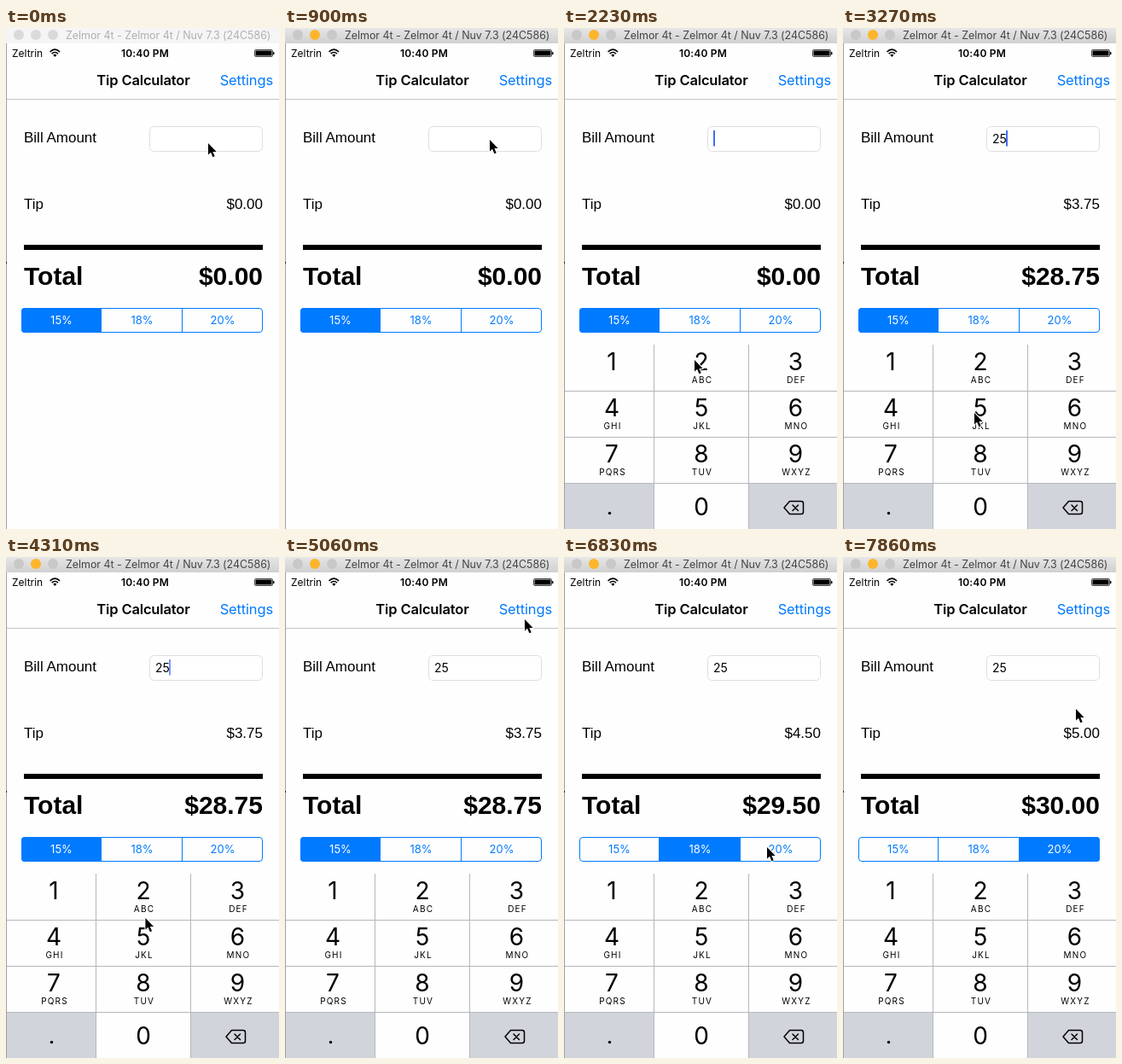
An HTML page that plays this animation: 320 by 587 pixels, repeating every 8000 ms.

```html
<!DOCTYPE html>
<html lang="en">
<head>
<meta charset="utf-8">
<title>Tip Calculator</title>
<style>
  html, body { margin: 0; height: 100%; overflow: hidden; background: #fff; }
  svg { display: block; width: 100vw; height: 100vh; }
  text { font-family: Inter, Roboto, sans-serif; white-space: pre; }
  .label { font: 17px "Liberation Sans", sans-serif; }
  .total { font: bold 30px "Liberation Sans", sans-serif; }
  .nav { font-size: 16.5px; letter-spacing: -.15px; }
  .status { font-size: 12px; }
  .semi { font-weight: 600; }
  .mid { text-anchor: middle; }
  .end { text-anchor: end; }
  .segment { font-size: 13px; }
  .digit { font-size: 28px; }
  .letters { font-size: 10px; letter-spacing: 1.2px; }
</style>
</head>
<body>
<svg viewBox="0 0 320 587">
  <defs>
    <linearGradient id="chrome" x2="0" y2="1">
      <stop stop-color="#e6e6e6"/><stop offset="1" stop-color="#d0d0d0"/>
    </linearGradient>
    <clipPath id="segmentClip"><rect x="18" y="328" width="283" height="29" rx="4"/></clipPath>
  </defs>
  <rect width="320" height="587" fill="#fefefe"/>

  <rect id="titleBar" width="320" height="18"/>
  <g id="lights"></g>
  <text id="title" x="70" y="13" font-size="12.5" letter-spacing="-.05">Zelmor 4t - Zelmor 4t / Nuv 7.3 (24C586)</text>

  <text class="status" x="7" y="33.5">Zeltrin</text>
  <g fill="none" stroke="#000" stroke-width="1.6">
    <path d="M51.5 28Q57.3 22.4 63.1 28M53.6 30.2Q57.3 26.8 61 30.2"/>
    <path d="M57.3 34L55.2 31.6Q57.3 29.8 59.4 31.6Z" fill="#000" stroke="none"/>
  </g>
  <text class="status semi mid" x="163" y="33.5" letter-spacing=".2">10:40 PM</text>
  <rect x="291.5" y="25.5" width="21" height="8" rx="1.5" fill="none" stroke="#000" stroke-width=".7"/>
  <rect x="292.5" y="26.5" width="19" height="6" rx=".6"/>
  <rect x="313" y="28" width="1.5" height="3.2" rx=".7"/>

  <text class="nav semi mid" x="161" y="67">Tip Calculator</text>
  <text class="nav end" x="313" y="67" fill="#007aff">Settings</text>
  <rect y="83" width="320" height="1" fill="#c4c4c4"/>

  <text class="label" x="21" y="134">Bill Amount</text>
  <rect x="168.5" y="115.5" width="132" height="29" rx="5" fill="#fff" stroke="#dedede"/>
  <text id="bill" x="175" y="134.5" font-size="14"></text>
  <rect id="caret" y="120" width="2" height="18.5" fill="#426bf2"/>
  <text class="label" x="21" y="212">Tip</text>
  <text class="label end" id="tip" x="301" y="212"></text>
  <rect x="21" y="254" width="280" height="6"/>
  <text class="total" x="21" y="301">Total</text>
  <text class="total end" id="total" x="301" y="301"></text>

  <rect id="selected" y="328" height="29" fill="#007aff" clip-path="url(#segmentClip)"/>
  <g fill="none" stroke="#007aff">
    <rect x="18.5" y="328.5" width="282" height="28" rx="3.5"/>
    <path d="M111.5 328V357M206.5 328V357"/>
  </g>
  <g id="segments"></g>

  <g id="keyboard">
    <rect y="371" width="320" height="216" fill="#fefefe"/>
    <path d="M0 534H105V587H0ZM217 534H320V587H217Z" fill="#d1d5db"/>
    <path d="M105.5 371V587M216.5 371V587M0 425.5H320M0 479.5H320M0 533.5H320" stroke="#b4b7bc"/>
    <g id="keys"></g>
    <g fill="none" stroke="#000" stroke-width="1.5" stroke-linejoin="round" stroke-linecap="round">
      <path d="M258 562L264.5 554.5H278Q280.5 554.5 280.5 557V567Q280.5 569.5 278 569.5H264.5Z"/>
      <path d="M268 559L274.5 565.5M274.5 559L268 565.5"/>
    </g>
  </g>

  <rect y="18" width="1" height="569" fill="#a0a0a0"/>
  <rect y="274" width="1" height="2" fill="#222"/>
  <path id="pointer" d="M0 0V13.6L3.1 10.8L5.4 16.2L7.7 15.2L5.4 9.9H9.7Z"
        stroke="#fff" stroke-width="2" paint-order="stroke" stroke-linejoin="round"/>
</svg>
<script>
const LOOP = 8000, TICK = 148.5;
const RATES = [15, 18, 20];
const SEGMENT_EDGES = [18, 111, 206, 301];
const SEGMENT_CENTERS = [65, 159.5, 254];
const KEY_CENTERS = [56, 161, 271.5];
const KEYS = ["1", "2 ABC", "3 DEF", "4 GHI", "5 JKL", "6 MNO", "7 PQRS", "8 TUV", "9 WXYZ", ".", "0"];

const ACTIVATE = 6, FOCUS = 7, TYPE_2 = 17, TYPE_5 = 22, PICK_18 = 42, PICK_20 = 49;

// Pointer stops: tick, x, y
const POINTER = [
  [3, 237, 135], [4, 240, 131], [10, 240, 131], [14, 155, 390], [15, 153, 389],
  [18, 153, 389], [21, 154, 451], [28, 154, 451], [34, 281, 73], [35, 281, 73],
  [41, 179, 342], [44, 179, 342], [46, 238, 340], [51, 238, 340], [53, 273, 178]
];

const $ = id => document.getElementById(id);
const clamp = v => Math.max(0, Math.min(1, v));
const set = (id, attrs) => {
  for (const name in attrs) $(id).setAttribute(name, attrs[name]);
};
const label = (cls, x, y, text) => `<text class="mid ${cls}" x="${x}" y="${y}">${text}</text>`;

$("lights").innerHTML = [15, 35, 55].map(x => `<circle cx="${x}" cy="8" r="6"/>`).join("");
$("segments").innerHTML = RATES.map((r, i) => label("segment", SEGMENT_CENTERS[i], 347, r + "%")).join("");
$("keys").innerHTML = KEYS.map((key, i) => {
  const [digit, letters] = key.split(" ");
  const x = KEY_CENTERS[i % 3], y = 371 + 54 * Math.floor(i / 3);
  if (digit === ".") return `<circle cx="53.5" cy="568.5" r="1.7"/>`;
  return label("digit", x, y + (digit === "0" ? 37.5 : 30), digit) +
    (letters ? label("letters", x + 1, y + 45, letters) : "");
}).join("");

function pointerAt(tick) {
  const next = POINTER.findIndex(stop => stop[0] > tick);
  if (next < 0) return POINTER[POINTER.length - 1].slice(1);
  if (next === 0) return POINTER[0].slice(1);
  const a = POINTER[next - 1], b = POINTER[next];
  const k = (tick - a[0]) / (b[0] - a[0]), ease = k * k * (3 - 2 * k);
  return [1, 2].map(i => a[i] + (b[i] - a[i]) * ease);
}

function caretOpacity(tick) {
  if (tick < FOCUS) return 0;
  const start = tick >= TYPE_5 ? TYPE_5 : tick >= TYPE_2 ? TYPE_2 : FOCUS;
  const age = (tick - start) * TICK;
  return age < 310 ? 1 : clamp((Math.abs((age + 770) % 1000 - 500) - 205) / 150);
}

function keyboardOffset(tick) {
  if (tick < FOCUS) return 216;
  const s = 13 * (tick * TICK - 950) / 1000;
  return Math.round(216 * (1 + s) * Math.exp(-s));
}

function draw(time) {
  const tick = Math.floor((time % LOOP + 12) / TICK);

  const active = tick >= ACTIVATE;
  set("titleBar", { fill: active ? "url(#chrome)" : "#f5f5f5" });
  set("title", { fill: active ? "#454545" : "#b0b0b0" });
  [...$("lights").children].forEach((light, i) =>
    light.setAttribute("fill", active ? (i === 1 ? "#fdb52c" : "#c8c8c8") : "#dadada"));

  const bill = tick >= TYPE_5 ? "25" : tick >= TYPE_2 ? "2" : "";
  const choice = tick >= PICK_20 ? 2 : tick >= PICK_18 ? 1 : 0;
  const tip = bill * RATES[choice] / 100;
  $("bill").textContent = bill;
  $("tip").textContent = "$" + tip.toFixed(2);
  $("total").textContent = "$" + (+bill + tip).toFixed(2);
  set("caret", { x: [175, 183, 191][bill.length], opacity: caretOpacity(tick) });

  const left = SEGMENT_EDGES[choice];
  set("selected", { x: left, width: SEGMENT_EDGES[choice + 1] - left + 1 });
  [...$("segments").children].forEach((text, i) =>
    text.setAttribute("fill", i === choice ? "#fff" : "#007aff"));

  set("keyboard", { transform: `translate(0 ${keyboardOffset(tick)})` });
  set("pointer", { transform: `translate(${pointerAt(tick)})` });
}

const begin = performance.now();
function loop() {
  draw(performance.now() - begin);
  requestAnimationFrame(loop);
}
loop();
</script>
</body>
</html>
```
